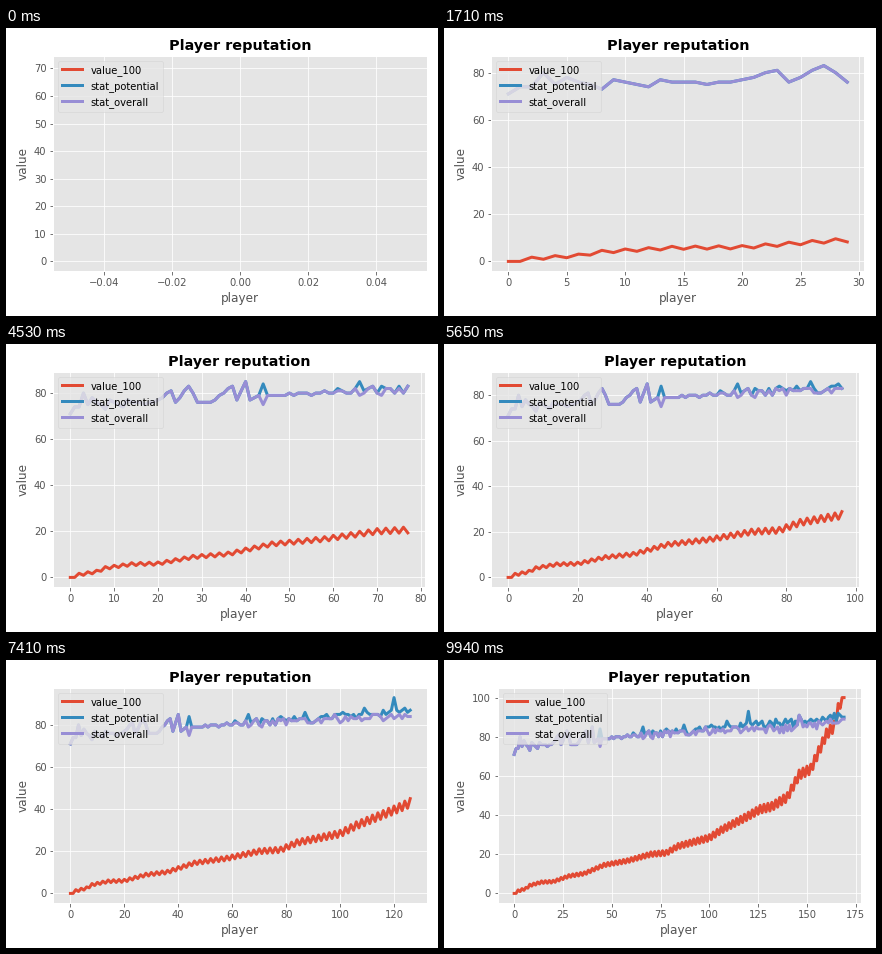
A matplotlib script that plays this animation: 432 px wide and 288 px high, repeating every 10 s.

```python
import numpy as np
import matplotlib.pyplot as plt
from matplotlib.animation import FuncAnimation

plt.style.use("ggplot")

COUNT = 170
STEPS = 2 * COUNT
LOOP_MS = 10000
players = np.arange(COUNT)
rng = np.random.default_rng(4)


def through(*points):
    """Straight segments through (player, value) points."""
    xs, ys = zip(*points)
    return np.interp(players, xs, ys)


def jitter(size):
    return rng.uniform(-1, 1, COUNT) * size


# Value: a rising crest, with every odd player dropping below it.
crest = through(
    (0, 0), (2, 1.8), (6, 3.1), (8, 4.7), (14, 6.4), (20, 6.7), (28, 9.6),
    (36, 11), (46, 15.4), (58, 17.7), (70, 21.2), (78, 22), (84, 25.5),
    (100, 30), (106, 34), (120, 41.5), (126, 45), (132, 46.5), (140, 51.5),
    (146, 63), (152, 66), (160, 84), (164, 88), (166, 97), (169, 106))
drop = 1.2 + 0.002 * players ** 1.5
value = np.clip(crest - drop * (players % 2), 0, 100)

# Overall: a few large swings, then a slow climb with growing jitter.
trend = through(
    (0, 71), (1, 74), (2, 74), (3, 80), (4, 75), (5, 78), (8, 73), (9, 77),
    (12, 74), (13, 77), (17, 75), (21, 78), (23, 81), (24, 76), (27, 83),
    (29, 76), (32, 76), (37, 83), (38, 77), (40, 85), (41, 77), (43, 79),
    (44, 75), (45, 79), (70, 81), (80, 82), (110, 83.5), (145, 84),
    (146, 90), (148, 85), (169, 88))
overall = np.round(trend + jitter(through((45, 0), (70, 2))))

# Potential: equal to overall at first, later a higher course with peaks.
course = through((60, 80), (110, 84.5), (130, 86.5), (150, 87.5), (169, 91))
course = np.round(course + jitter(2))
potential = np.where(players > 60, np.maximum(overall, course), overall)
for player, peak in (44, 84), (66, 85), (87, 86), (109, 88), (120, 93):
    potential[player] = peak

fig, ax = plt.subplots(figsize=(6, 4), dpi=72)
series = {"value_100": value, "stat_potential": potential,
          "stat_overall": overall}
lines = [ax.plot([], [], lw=3, label=name)[0] for name in series]
ax.set_title("Player reputation", fontweight="bold")
ax.set_xlabel("player")
ax.set_ylabel("value")
ax.legend(loc="upper left").set_in_layout(False)


def show(last):
    shown = slice(0, last + 1)
    for line, data in zip(lines, series.values()):
        line.set_data(players[shown], data[shown])
    ax.relim()
    ax.autoscale_view()
    # Begin from a fixed layout so each frame stands alone.
    fig.subplots_adjust(left=0.11, right=0.97, bottom=0.157, top=0.9)
    fig.tight_layout()


def draw(step):
    # Each player arrives half a beat early; the last one holds.
    last = min((step + 1) // 2, COUNT - 1)
    if step == 0 or step % 2:
        show(last)
    return lines


anim = FuncAnimation(fig, draw, frames=STEPS, interval=LOOP_MS / STEPS,
                     init_func=lambda: draw(0), repeat=True, repeat_delay=0)
plt.show()
```
